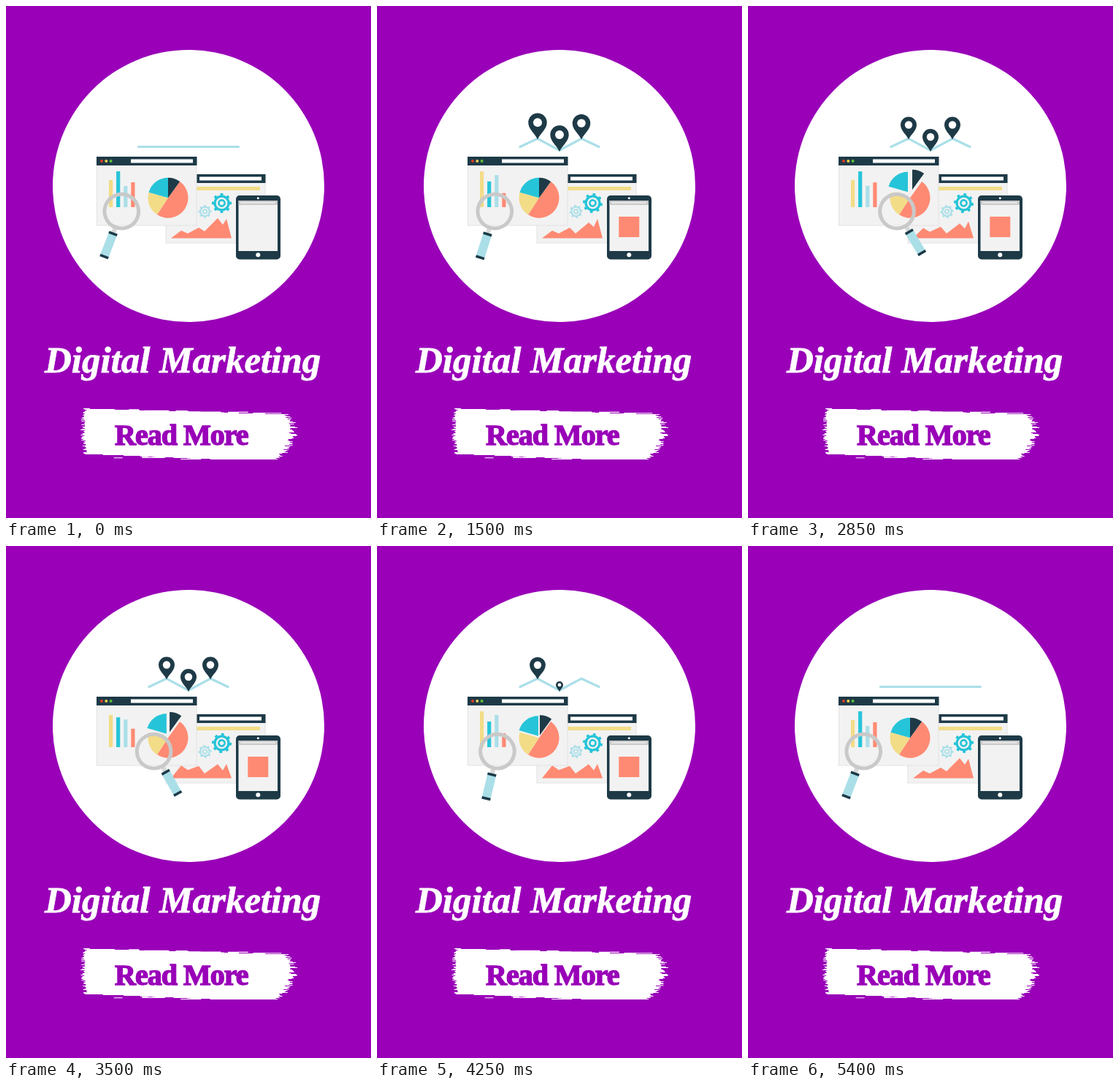
These frames come from a looping animation (500 px wide and 700 px high, 5.45 s). An HTML page:

```html
<!DOCTYPE html>
<html lang="en">
<head>
<meta charset="utf-8">
<title>Digital Marketing</title>
<style>
  html, body { margin: 0; width: 100%; height: 100%; overflow: hidden; background: #9900b8; }
  svg { display: block; width: 500px; height: 700px; }
  .title { font: italic bold 51px "Liberation Serif", serif; fill: #fff; stroke: #fff; stroke-width: .8px; }
  .more { font: bold 40px "Liberation Serif", serif; fill: #9900b8; stroke: #9900b8; stroke-width: 1.5px; letter-spacing: -1px; }
  .navy { fill: #1e3a47; }
  .teal { fill: #26c4d8; }
  .sky { fill: #aadfe8; }
  .sand { fill: #f2dc87; }
  .coral { fill: #ff8a73; }
  .paper { fill: #f2f2f2; stroke: #e2e2e2; }
  .white { fill: #fff; }
</style>
</head>
<body>
<svg viewBox="0 0 500 700">
  <rect width="500" height="700" fill="#9900b8"/>
  <circle cx="250" cy="246" r="186" class="white"/>

  <polyline id="line" fill="none" stroke="#aadfe8" stroke-width="3.2" stroke-linecap="round" stroke-linejoin="round"/>
  <g id="pins"></g>

  <rect x="219" y="230.5" width="136" height="93.5" class="paper"/>
  <rect x="219" y="230" width="136.5" height="12" class="navy"/>
  <rect x="265" y="233.5" width="85" height="5" class="white"/>
  <rect x="225" y="247" width="123" height="5" class="sand"/>
  <polygon id="area" class="coral"/>
  <g id="gears"></g>

  <rect x="124.5" y="206.5" width="136.5" height="93.5" class="paper"/>
  <rect x="124" y="206" width="137.5" height="12" class="navy"/>
  <circle cx="131" cy="212" r="2" fill="#e23a24"/>
  <circle cx="137.3" cy="212" r="2" fill="#f4d04e"/>
  <circle cx="143.6" cy="212" r="2" fill="#5cc236"/>
  <rect x="171" y="209.5" width="85" height="5" class="white"/>
  <g id="bars"></g>
  <g id="pie"></g>

  <rect x="315" y="259" width="61" height="87.5" rx="5" class="navy"/>
  <rect x="318.5" y="266" width="53.5" height="69" fill="#f2f2f2"/>
  <rect x="318.5" y="266" width="53.5" height="6" fill="#c9c9c9"/>
  <rect x="321" y="268" width="48" height="2" fill="#e9e9e9"/>
  <circle cx="345.3" cy="262.8" r="1.5" class="white"/>
  <circle cx="345.3" cy="340.3" r="3" class="white"/>
  <rect id="badge" x="-14" y="-14" width="28" height="28" class="coral"/>

  <g id="glass">
    <rect x="-3" y="24" width="6" height="8" fill="#d8d8d8"/>
    <rect x="-6" y="31" width="12" height="37" class="sky"/>
    <rect x="-6" y="31" width="12" height="3.5" class="navy"/>
    <rect x="-6" y="64.5" width="12" height="3.5" class="navy"/>
    <circle r="23.3" fill="none" stroke="#c9c9c9" stroke-width="5"/>
  </g>

  <text x="53" y="501" class="title">Digital Marketing</text>
  <path id="brush" class="white"/>
  <text x="149" y="600" class="more">Read More</text>
</svg>
<script>
const LOOP = 5450, STEP = 50;
const $ = id => document.getElementById(id);
const set = (el, attrs) => { for (const k in attrs) el.setAttribute(k, attrs[k]); return el; };
const add = (parent, tag, attrs) =>
  parent.appendChild(set(document.createElementNS("http://www.w3.org/2000/svg", tag), attrs));

const clamp = p => Math.max(0, Math.min(1, p));
const lerp = (a, b, p) => a + (b - a) * p;
const linear = p => p;
const sine = p => (1 - Math.cos(Math.PI * p)) / 2;
const inOut = n => p => p < .5 ? (2 * p) ** n / 2 : 1 - (2 - 2 * p) ** n / 2;
const out = p => 1 - (1 - p) ** 2;
const back = p => 1 + 3.25 * (p - 1) ** 3 + 2.25 * (p - 1) ** 2;

// Rises over `rise` ms from `start`, falls over `fall` ms until `end`
const swell = (t, start, rise, end, fall, ease) =>
  ease(Math.min(clamp((t - start) / rise), clamp((end - t) / fall)));

// Brush stroke: ragged one-pixel rows plus stray bristles along both edges
function drawBrush() {
  let seed = 11, d = "";
  const rnd = () => (seed = seed * 16807 % 2147483647) / 2147483647;
  const row = (y, a, b) => { d += `M${a.toFixed(1)} ${y.toFixed(1)}H${b.toFixed(1)}v1.1H${a.toFixed(1)}z`; };
  for (let y = 550; y <= 619; y++) {
    const under = Math.max(0, y - 612);
    const left = 102 + 6 * rnd() + 4 * ((y - 580) / 30) ** 2 + under * 24;
    const right = 400 - 12 * rnd() - 16 * ((y - 582) / 30) ** 2;
    row(y, left, Math.min(right, 115 + (y - 550) * 34));
  }
  for (let i = 0; i < 36; i++) {
    const x = 108 + 250 * rnd(), length = 6 + 28 * rnd();
    const top = 549 + (x - 108) / 34;
    row(i % 2 ? top + 2 * rnd() : 612 + 7 * rnd(), x, x + length);
  }
  set($("brush"), { d });
}
drawBrush();

const pins = [220, 250, 280].map((x, i) => {
  const el = add($("pins"), "g", {});
  add(el, "path", { class: "navy", d: "M0 0C-3-7-11-12-11-20A11 11 0 0 1 11-20C11-12 3-7 0 0z" });
  add(el, "circle", { class: "white", cy: -20, r: 5.2 });
  return { el, x, y: i % 2 ? 199 : 182.5 };
});

function makeGear(x, y, r, color, dir) {
  const el = add($("gears"), "g", {});
  const ring = (radius, width) =>
    add(el, "circle", { r: radius * r, fill: "none", stroke: color, "stroke-width": width * r });
  ring(.7, .24);
  ring(.3, .2);
  for (let i = 0; i < 8; i++)
    add(el, "rect", {
      x: -.14 * r, y: -r, width: .28 * r, height: .25 * r, fill: color, transform: `rotate(${i * 45})`
    });
  return { el, x, y, dir };
}
const gears = [makeGear(295.5, 269.5, 13.5, "#26c4d8", 1), makeGear(272.5, 281, 9, "#aadfe8", -1)];

const bars = [["sand", 238, 226], ["teal", 226, 240], ["sky", 246, 231], ["coral", 241, 256]]
  .map(([c, low, high], i) =>
    ({ low, high, el: add($("bars"), "rect", { class: c, x: 141 + 10.1 * i, width: 5.2 }) }));

function makeSlice(color, from, to, dx = 0, dy = 0) {
  const at = deg => {
    const a = deg * Math.PI / 180;
    return `${27.5 * Math.sin(a)} ${-27.5 * Math.cos(a)}`;
  };
  const d = `M0 0L${at(from)}A27.5 27.5 0 0 1 ${at(to)}z`;
  return { dx, dy, el: add($("pie"), "path", { class: color, d }) };
}
const slices = [
  makeSlice("coral", 36, 213), makeSlice("sand", 213, 286),
  makeSlice("teal", 286, 360, -3, -8), makeSlice("navy", 0, 36, 3, -11)
];

const hills = [[240, 307], [249, 311], [264, 303], [272, 308], [290, 290], [297, 299], [302, 291]];

function draw(t) {
  const bend = swell(t, 500, 600, 4950, 550, inOut(2));
  const end = lerp(181.5, 196, bend), peak = lerp(192.5, 181.3, bend), dip = lerp(192.5, 197.3, bend);
  set($("line"), { points: [end, 192.5, 220, peak, 250, dip, 280, peak, 500 - end, 192.5].join(" ") });
  pins.forEach((p, i) => {
    const size = swell(t, 940 + 75 * i, 1000, 4400 - 100 * i, 500, back);
    set(p.el, {
      transform: `translate(${p.x} ${p.y}) scale(${Math.max(0, size)})`,
      visibility: size > .01 ? "visible" : "hidden"
    });
  });

  const dent = swell(t, 200, 1300, 5400, 1100, inOut(3));
  const tilt = swell(t, 2300, 1100, 5400, 1100, sine);
  const ridge = hills.map(([x, y], i) =>
    `${x} ${y + 6 * dent * Math.max(0, 1 - Math.abs(i - 4) / 2) + 7 * tilt * (i / 3 - 1)}`);
  set($("area"), { points: `226 317.5 ${ridge.join(" ")} 309 317.5` });

  for (const g of gears)
    set(g.el, { transform: `translate(${g.x} ${g.y}) rotate(${g.dir * 360 * t / LOOP})` });

  const level = Math.max(swell(t, 600, 700, 2850, 1450, sine), swell(t, 2750, 1350, 5350, 1100, sine));
  for (const b of bars) {
    const y = lerp(b.low, b.high, level);
    set(b.el, { y, height: 275 - y });
  }
  const gap = swell(t, 1550, 700, 4900, 2000, linear);
  for (const s of slices)
    set(s.el, { transform: `translate(${222 + s.dx * gap} ${262.3 + s.dy * gap})` });

  const swing = swell(t, 1090, 1615, 4775, 1585, inOut(3));
  set($("glass"), { transform: `translate(${lerp(158.3, 204, swing)} 280.7) rotate(${lerp(21, -31, swing)})` });
  const size = swell(t, 400, 350, 4850, 400, out);
  set($("badge"), { transform: `translate(345.3 302) scale(${size})` });
}

const start = performance.now();
function tick() {
  const t = (performance.now() - start) % LOOP;
  draw(Math.floor(t / STEP) * STEP);
  requestAnimationFrame(tick);
}
draw(0);
requestAnimationFrame(tick);
</script>
</body>
</html>
```
